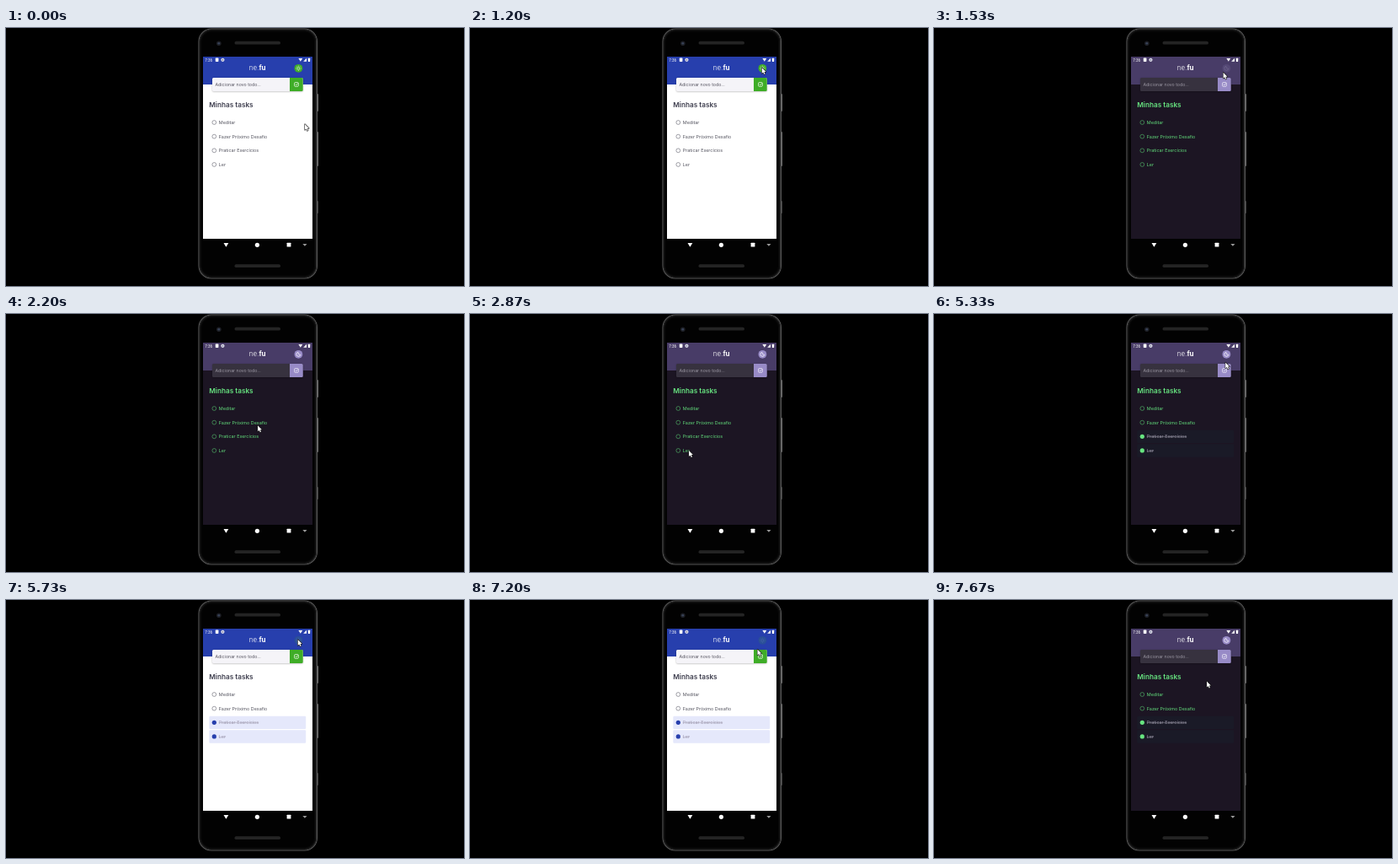
An HTML page with a canvas that plays this animation: 544 by 306 pixels, repeating every 8 s.

```html
<!DOCTYPE html>
<html lang="pt-BR">
<head>
<meta charset="utf-8">
<title>Minhas tasks</title>
<style>
html, body { margin: 0; width: 100%; height: 100%; overflow: hidden; background: #000; }
canvas { display: block; width: 100vw; height: 100vh; }
</style>
</head>
<body>
<canvas id="stage"></canvas>
<script>
const W = 544, H = 306, LOOP = 8000;
const canvas = document.getElementById('stage');
const c = canvas.getContext('2d');
const UI = 'Inter, "Open Sans", sans-serif';

const light = {
  header: '#273fad', page: '#ffffff', input: '#f5f4f8', hint: '#55535f',
  accent: '#3fad27', icon: '#ffffff', title: '#3d3d4d', text: '#54545f',
  ring: '#62626d', dot: '#273fad', done: '#a09cb1', row: '#e5e8fb'
};
const dark = {
  header: '#483c67', page: '#1c1523', input: '#37323f', hint: '#9b97a3',
  accent: '#988bc7', icon: '#f7f5fc', title: '#67e480', text: '#62dc7b',
  ring: '#55bf6c', dot: '#67e480', done: '#9692a3', row: '#1a1a27'
};

// Clicks in ms; the app answers a little later
const PRESS = 450, DELAY = 150;
const toggleClicks = [1250, 5550, 7080];
const tasks = [
  { name: 'Meditar' },
  { name: 'Fazer Próximo Desafio' },
  { name: 'Praticar Exercícios', click: 3700 },
  { name: 'Ler', click: 3250 }
];
const rowY = i => 112 + i * 16.65;

// Where the pointer rests, and when it travels to each spot
const spot = {
  start: [355, 114], toggle: [346.7, 47], list: [302, 130],
  last: [260, 162], third: [266, 145], side: [332.8, 128],
  below: [345, 84], away: [324, 96.5]
};
const moves = [
  [400, 1000, 'toggle'], [1440, 2000, 'list'], [2070, 2870, 'last'],
  [3400, 3650, 'third'], [3760, 4000, 'side'], [4100, 4600, 'below'],
  [5200, 5400, 'toggle'], [5760, 6200, 'below'], [6530, 6800, 'toggle'],
  [7000, 7640, 'away']
];

const clamp = v => Math.max(0, Math.min(1, v));
const ease = v => v * v * (3 - 2 * v);

function pointerAt(t) {
  let [x, y] = spot.start;
  for (const [from, to, name] of moves) {
    const k = ease(clamp((t - from) / (to - from)));
    x += (spot[name][0] - x) * k;
    y += (spot[name][1] - y) * k;
  }
  return [x, y];
}

// Opacity of a pressed control: quick dip, slower return
function pressAlpha(t, click, low) {
  const down = clamp((t - click) / 100), up = clamp((click + PRESS - t) / 170);
  return 1 - (1 - low) * ease(Math.min(down, up));
}

function fill(color) {
  c.fillStyle = color;
  c.fill();
}

function stroke(color, width) {
  c.strokeStyle = color;
  c.lineWidth = width;
  c.stroke();
}

function rect(x, y, w, h, r = 0) {
  c.beginPath();
  c.roundRect(x, y, w, h, r);
}

function box(x, y, w, h, r, color) {
  rect(x, y, w, h, r);
  fill(color);
}

function circle(x, y, r) {
  c.beginPath();
  c.arc(x, y, r, 0, Math.PI * 2);
}

function disc(x, y, r, color) {
  circle(x, y, r);
  fill(color);
}

function ring(x, y, r, color, width) {
  circle(x, y, r);
  stroke(color, width);
}

function trace(points) {
  c.beginPath();
  points.forEach(([x, y]) => c.lineTo(x, y));
}

function line(points, color, width) {
  trace(points);
  stroke(color, width);
}

function triangle(x, y, w, h, color) {
  trace([[x - w / 2, y - h / 2], [x + w / 2, y - h / 2], [x, y + h / 2]]);
  fill(color);
}

function label(str, x, y, font, color) {
  c.font = font;
  c.fillStyle = color;
  c.fillText(str, x, y);
  return c.measureText(str).width;
}

function drawPhone() {
  box(369, 78, 2, 21, 1, '#777');
  box(369, 123, 2, 41, 1, '#777');
  box(369, 205, 2, 15, 1, '#444');
  box(228.5, 0.5, 141.5, 297, 15, '#020202');
  // Rim light fading inwards
  for (let i = 0; i < 4; i++) {
    const g = 92 * 0.45 ** i;
    rect(229 + i, 1 + i, 140.5 - 2 * i, 296 - 2 * i, 15 - i);
    stroke(`rgb(${g},${g},${g})`, 1.1);
  }
  for (const y of [15.8, 280.3]) box(271.5, y, 54.5, 3.8, 1.9, '#242424');
  disc(252.8, 18.2, 2.8, '#1d1f25');
  disc(252.8, 18.2, 1.3, '#39445a');
}

function drawNav() {
  triangle(261.4, 257.3, 5.8, 4.8, '#fff');
  disc(298.4, 257.3, 2.6, '#fff');
  box(333.6, 254.8, 4.8, 4.8, 0.4, '#fff');
  triangle(354.9, 257.4, 5.2, 2.8, '#999');
}

function drawStatus() {
  label('7:36', 236.3, 39.6, '4.6px Roboto, sans-serif', '#fff');
  box(248.8, 35.6, 3.6, 4.3, 0.6, '#fff');
  disc(257.4, 37.8, 2.1, '#e6e6f0');
  disc(257.4, 37.8, 0.9, '#777a9c');
  triangle(349.8, 37.8, 4.8, 3.8, '#fff');
  trace([[353.2, 39.8], [357, 39.8], [357, 35.8]]);
  fill('#fff');
  box(358.8, 35.8, 2.4, 4.2, 0.4, '#fff');
}

function drawMoon(x, y, color) {
  const r = 2.5, a = 0.2;
  c.beginPath();
  c.arc(x, y, r, a, 4.5);
  c.quadraticCurveTo(x - 0.6, y + 0.9, x + r * Math.cos(a), y + r * Math.sin(a));
  stroke(color, 0.8);
}

function drawSun(x, y, color) {
  ring(x, y, 1.4, color, 0.6);
  for (let a = 0; a < Math.PI * 2; a += Math.PI / 4) {
    line([2.2, 3.2].map(r => [x + r * Math.cos(a), y + r * Math.sin(a)]), color, 0.6);
  }
}

function drawToggle(s, t) {
  const x = 347.4, y = 47.8;
  c.globalAlpha = Math.min(...toggleClicks.map(at => pressAlpha(t, at, 0.15)));
  disc(x, y, 4.9, s.accent);
  (s === dark ? drawMoon : drawSun)(x, y, s.icon);
  c.globalAlpha = 1;
}

function drawInput(s) {
  c.save();
  c.shadowColor = 'rgba(0,0,0,.3)';
  c.shadowBlur = 2;
  c.shadowOffsetY = 0.5;
  box(245, 59, 107.7, 16, 1.5, s.input);
  c.restore();
  box(337, 59, 15.7, 16, [0, 1.5, 1.5, 0], s.accent);
  label('Adicionar novo todo...', 248.5, 69, '5.25px ' + UI, s.hint);
  rect(342.6, 64.6, 4.7, 4.7, 0.9);
  stroke(s.icon, 0.7);
  line([[343.8, 66.8], [344.8, 67.8], [347, 65.4]], s.icon, 0.7);
}

function drawTask({ name, click }, i, s, t) {
  const y = rowY(i), done = t >= click + DELAY / 2;
  const color = done ? s.done : s.text;
  if (done) box(241.3, y - 7.6, 114.9, 15.3, 1.2, s.row);
  if (click) c.globalAlpha = pressAlpha(t, click, 0.5);
  if (done) disc(247.3, y, 2.6, s.dot);
  else ring(247.3, y, 2.4, s.ring, 0.6);
  const w = label(name, 252.8, y + 2, '5.42px ' + UI, color);
  if (done) line([[252.8, y + 0.3], [252.8 + w, y + 0.3]], color, 0.5);
  c.globalAlpha = 1;
}

function drawPointer(x, y) {
  const head = 5.2, length = 7;
  c.lineJoin = 'round';
  const shape = () => {
    trace([[x, y], [x, y + length], [x + 1.6, y + 5.5], [x + 2.8, y + 8.1],
      [x + 3.9, y + 7.6], [x + 2.8, y + 5.1], [x + head - 0.3, y + head - 0.2]]);
    c.closePath();
  };
  shape();
  stroke('#111', 1.1);
  fill('#fff');
}

function draw(t) {
  const flips = toggleClicks.filter(at => t >= at + DELAY).length;
  const s = flips % 2 ? dark : light;
  c.fillStyle = '#000';
  c.fillRect(0, 0, W, H);
  drawPhone();
  box(234, 34, 130, 216, 0, s.page);
  box(234, 34, 130, 33, 0, s.header);
  drawStatus();
  const w = label('ne.', 288.8, 50.2, '300 8px ' + UI, '#fff');
  label('fu', 288.8 + w, 50.2, '700 8px ' + UI, '#fff');
  drawToggle(s, t);
  drawInput(s);
  label('Minhas tasks', 241.3, 93.8, '600 8.2px ' + UI, s.title);
  tasks.forEach((task, i) => drawTask(task, i, s, t));
  drawNav();
  drawPointer(...pointerAt(t));
}

function resize() {
  const dpr = window.devicePixelRatio || 1;
  canvas.width = Math.round(innerWidth * dpr);
  canvas.height = Math.round(innerHeight * dpr);
  c.setTransform(canvas.width / W, 0, 0, canvas.height / H, 0, 0);
}

let start;
function frame(now) {
  start ??= now;
  draw((now - start) % LOOP);
  requestAnimationFrame(frame);
}

addEventListener('resize', resize);
resize();
draw(0);
requestAnimationFrame(frame);
</script>
</body>
</html>
```
